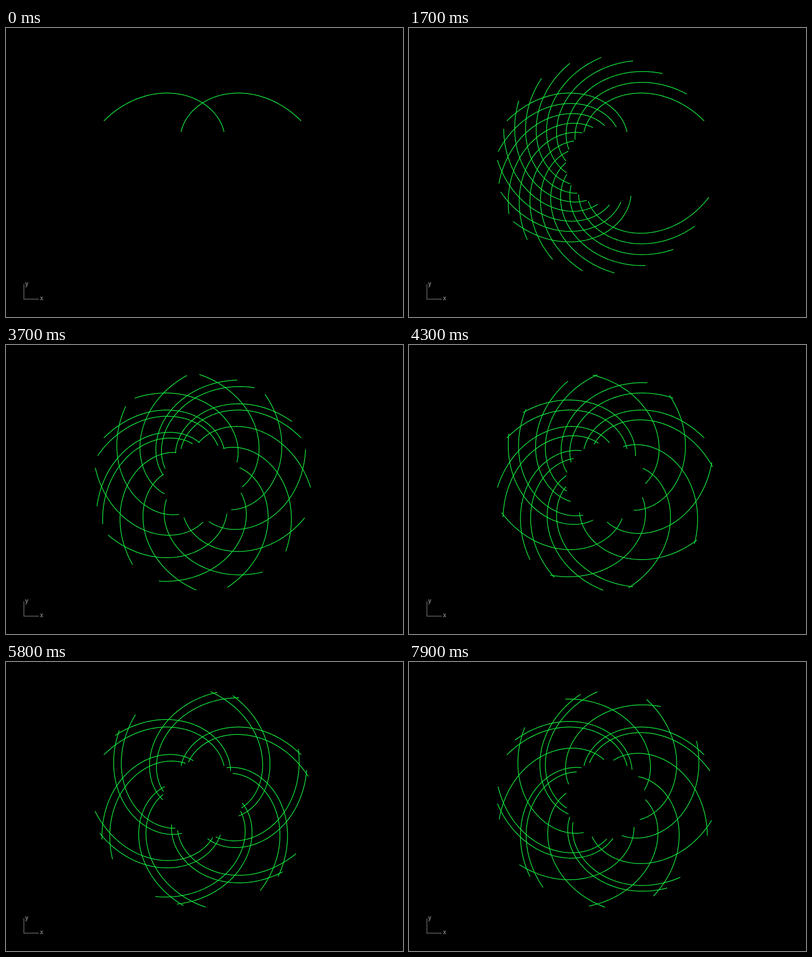
An HTML page with a canvas that plays this animation: 799x583 px, repeating every 8000 ms.

```html
<!DOCTYPE html>
<html lang="en">
<head>
<meta charset="utf-8">
<title>Rotating spirals</title>
<style>
  html, body { margin: 0; width: 100%; height: 100%; overflow: hidden; background: #000; }
  canvas, svg { position: absolute; left: 0; top: 0; width: 799px; height: 583px; }
  .axes { fill: none; stroke: #666; stroke-width: 1.5; }
  text { font: bold 12px "DejaVu Sans Mono", monospace; fill: #777; }
</style>
</head>
<body>
<canvas width="799" height="583"></canvas>
<svg viewBox="0 0 799 583">
  <path class="axes" d="M36 517V547H66"/>
  <text x="38" y="520">y</text>
  <text x="68" y="549">x</text>
</svg>
<script>
const ctx = document.querySelector('canvas').getContext('2d');
const CENTER = { x: 395.5, y: 277 };
const PITCH = 80.1;      // radius gained per radian
const FROM = 1, TO = Math.E;
const SEGMENTS = 80;
const COPIES = 12;
const STEP_MS = 100, STEPS = 80;

ctx.strokeStyle = '#14e13c';
ctx.lineWidth = 1.5;

// Archimedean spiral arc, optionally mirrored before it is turned
function spiral(turn, mirrored) {
  ctx.beginPath();
  for (let i = 0; i <= SEGMENTS; i++) {
    const theta = FROM + (TO - FROM) * i / SEGMENTS;
    const angle = (mirrored ? Math.PI - theta : theta) + turn;
    ctx.lineTo(
      CENTER.x + PITCH * theta * Math.cos(angle),
      CENTER.y - PITCH * theta * Math.sin(angle)
    );
  }
  ctx.stroke();
}

// Neighbouring copies are spread by `degrees`
function draw(degrees) {
  ctx.clearRect(0, 0, 799, 583);
  // Without any spread all copies coincide, so one is enough
  const copies = degrees ? COPIES : 1;
  for (let i = 0; i < copies; i++) {
    const turn = i * degrees * Math.PI / 180;
    spiral(turn, false);
    spiral(turn, true);
  }
}

const start = performance.now();
let shown = -1;
function tick() {
  const step = Math.floor((performance.now() - start) / STEP_MS) % STEPS;
  if (step !== shown) draw(shown = step);
  requestAnimationFrame(tick);
}
tick();
</script>
</body>
</html>
```
